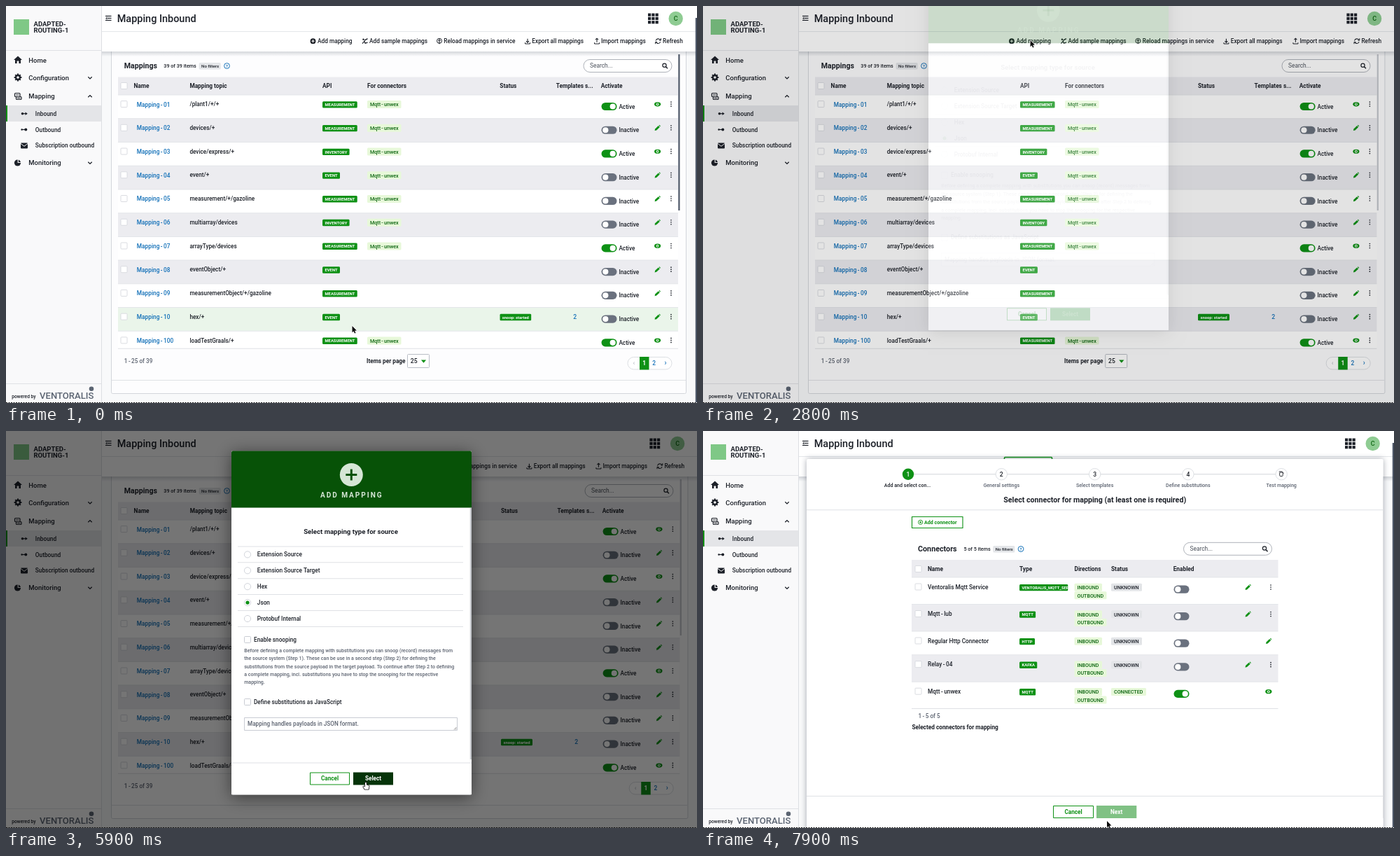
An HTML page with a canvas that plays this animation: 987x567 px, repeating every 8000 ms.

```html
<!DOCTYPE html>
<html lang="en">
<head>
<meta charset="utf-8">
<title>Mapping Inbound</title>
<style>
html, body { margin: 0; width: 100%; height: 100%; overflow: hidden; background: #fff; }
canvas { display: block; width: 987px; height: 567px; }
</style>
</head>
<body>
<canvas id="stage"></canvas>
<script>
const W = 987, H = 567, LOOP = 8000;
const cv = document.getElementById('stage'), c = cv.getContext('2d');
const dpr = window.devicePixelRatio || 1;
cv.width = W * dpr;
cv.height = H * dpr;

const GREEN = '#0e9115', DEEP = '#075207', INK = '#1d2129', MUTE = '#5c6370', BLUE = '#1270b8',
  GREY = '#ececf0', LINE = '#dfe1e5', LIME = '#e7f8d9', FOREST = '#0b640f';

const clamp = v => Math.max(0, Math.min(1, v));
const ramp = (t, a, b) => clamp((t - a) / (b - a));
const smooth = p => p * p * (3 - 2 * p);

// ---- primitives ----
function rect(x, y, w, h, fill, r = 0, stroke, lw = 1) {
  c.beginPath();
  c.roundRect(x, y, w, h, r);
  if (fill) { c.fillStyle = fill; c.fill(); }
  if (stroke) { c.strokeStyle = stroke; c.lineWidth = lw; c.stroke(); }
}
function disc(x, y, r, fill, stroke, lw = 1) {
  c.beginPath();
  c.arc(x, y, r, 0, Math.PI * 2);
  if (fill) { c.fillStyle = fill; c.fill(); }
  if (stroke) { c.strokeStyle = stroke; c.lineWidth = lw; c.stroke(); }
}
function path(pts, stroke, lw = 1, fill) {
  c.beginPath();
  pts.forEach(([x, y], i) => i ? c.lineTo(x, y) : c.moveTo(x, y));
  if (fill) { c.closePath(); c.fillStyle = fill; c.fill(); }
  if (stroke) { c.strokeStyle = stroke; c.lineWidth = lw; c.stroke(); }
}
const at = (x, y, pts) => pts.map(p => [x + p[0], y + p[1]]);
const hline = (x1, x2, y, col = LINE) => rect(x1, y - .5, x2 - x1, 1, col);

function text(s, x, y, size = 8.25, weight = 500, col = INK, align = 'left') {
  c.font = `${weight} ${size}px Roboto, Inter, sans-serif`;
  c.fillStyle = col;
  c.textAlign = align;
  c.fillText(s, x, y + size * .355);
  return c.measureText(s).width;
}
// hyphenated name with a little air around the hyphen
function dashed(s, x, y, size = 8.25, weight = 500, col = INK) {
  s.split(/(-)/).forEach(part => {
    x += text(part, x, y, size, weight, col) + size * .18;
  });
}
const bold = (s, x, y, size = 8.3, col = INK, align) => text(s, x, y, size, 700, col, align);

// ---- widgets ----
const box = (x, y) => rect(x - 4.5, y - 4.5, 9, 9, '#fff', 1, '#d6d9de', .9);
const dots = (x, y) => [-3, 0, 3].forEach(d => disc(x, y + d, .85, INK));

function badge(s, x, y, max = 99) {
  c.font = '700 5.85px Roboto, Inter, sans-serif';
  const w = Math.min(max, c.measureText(s).width + 7);
  c.save();
  c.beginPath();
  c.rect(x, y - 6, w, 12);
  c.clip();
  rect(x, y - 4.6, w, 9.4, GREEN, 1.5);
  text(s, x + 3.5, y + .2, 5.85, 700, '#fff');
  c.restore();
}
function chip(s, x, y, w, fill = LIME, col = FOREST) {
  rect(x, y - 5.5, w, 11, fill, 1.5);
  dashed(s, x + 4, y + .2, 7.15, 500, col);
}
function toggle(x, y, on) {
  rect(x, y - 5.6, 22, 11.2, on ? GREEN : '#6a717e', 5.6);
  disc(x + (on ? 16.2 : 5.8), y, 4.1, '#fff');
}
function eye(x, y) {
  c.beginPath();
  c.ellipse(x, y, 4.6, 3.1, 0, 0, 7);
  c.fillStyle = GREEN;
  c.fill();
  disc(x, y, 1.9, '#fff');
  disc(x, y, 1, GREEN);
}
function pencil(x, y) {
  path(at(x, y, [[-4, 4], [-3.4, 1.4], [1.2, -3], [3.2, -1], [-1.4, 3.4]]), null, 1, GREEN);
  path(at(x, y, [[1.9, -3.5], [2.8, -4.2], [4.3, -2.6], [3.7, -1.7]]), null, 1, GREEN);
}
function chevron(x, y, up) {
  const d = up ? -1 : 1;
  path(at(x, y, [[-2.7, -1.3 * d], [0, 1.4 * d], [2.7, -1.3 * d]]), INK, 1.3);
}
function search(x, y) {
  rect(x, y - 9, 126, 18, '#fff', 9, '#a5aab2', .9);
  text('Search...', x + 9, y, 8.4, 400, '#4c525c');
  disc(x + 115.5, y - .8, 2.6, null, INK, 1.2);
  path([[x + 117.4, y + 1.2], [x + 120, y + 3.8]], INK, 1.5);
}
function tools(x, y, count, badgeX, helpX) {
  text(count, x, y + .2, 7.2);
  rect(badgeX, y - 4.6, 31, 9.6, '#e4e6e9', 1.5);
  text('No filters', badgeX + 3.4, y + .3, 6.1);
  disc(helpX, y, 3.9, null, BLUE, 1);
  bold('?', helpX, y, 6, BLUE, 'center');
}
function button(s, x, y, w, fill) {
  if (fill) rect(x, y - 9, w, 18, fill);
  else rect(x + .5, y - 8.5, w - 1, 17, '#fff', 0, GREEN, 1);
  bold(s, x + w / 2, y, 8.2, fill ? '#fff' : GREEN, 'center');
}
function arrowDown(x, y, up) {
  const d = up ? -1 : 1;
  path([[x, y - 3.5], [x, y + 1.5]], INK, 1.1);
  path(at(x, y, up ? [[-2, -2], [0, -4], [2, -2]] : [[-2, 0], [0, 2], [2, 0]]), INK, 1.1);
  path(at(x, y, [[-3.5, 2], [-3.5, 3.8], [3.5, 3.8], [3.5, 2]]), INK, 1);
}

// ---- page ----
function sidebar() {
  rect(0, 0, 136, H, '#f9f9fa');
  rect(136, 0, 1, H, '#dddfe3');
  rect(11, 19, 22, 22, '#7fc886');
  bold('ADAPTED-', 39.5, 26, 9.5);
  bold('ROUTING-1', 39.5, 34.7, 9.5);
  hline(0, 136, 63.5);
  rect(0, 142, 136, 23, '#e4e5e8');
  rect(0, 142, 2, 23, GREEN);
  [['Home', 77.5], ['Configuration', 102.5], ['Mapping', 129], ['Monitoring', 224]]
    .forEach(([s, y]) => text(s, 32.3, y, 9.5));
  [['Inbound', 154], ['Outbound', 176.7], ['Subscription outbound', 199.5]]
    .forEach(([s, y]) => text(s, 41.8, y, 8.3));
  chevron(120, 102.5);
  chevron(120, 129, true);
  chevron(120, 224);

  path(at(17, 77, [[-6, 0], [0, -5.5], [6, 0], [4, 0], [4, 5], [1.4, 5], [1.4, 1.5], [-1.4, 1.5], [-1.4, 5], [-4, 5], [-4, 0]]), null, 1, INK);
  disc(17, 102, 3, null, INK, 2.4);
  for (let i = 0; i < 8; i++) {
    const a = i * Math.PI / 4, x = Math.cos(a), y = Math.sin(a);
    path([[17 + x * 3.8, 102 + y * 3.8], [17 + x * 5.4, 102 + y * 5.4]], INK, 2);
  }
  rect(12.5, 124.5, 7.5, 5, null, 1, INK, 1.2);
  rect(14.5, 129.5, 7.5, 4, null, 1, INK, 1.2);
  hline(14, 18.5, 127, INK);
  hline(16, 20.5, 131.5, INK);
  disc(16.5, 224, 4.6, INK);
  path([[17.2, 218], [17.2, 223.5], [22.5, 223.5]], '#f9f9fa', 1.2);
  disc(23.5, 153.7, 1.8, INK);
  path([[23, 153.7], [30, 153.7]], INK, 1.2);
  path(at(29, 153.7, [[-1.5, -2.2], [1.8, 0], [-1.5, 2.2]]), null, 1, INK);
  path([[22, 176.5], [28, 176.5]], INK, 1.2);
  disc(28.3, 176.5, 2, INK);
  disc(22.6, 176.5, 1.2, INK);
  rect(21, 195.5, 10, 8, INK, 1);
  path([[21, 196.5], [26, 200.3], [31, 196.5]], '#f9f9fa', 1);

  hline(0, 136, 539.5);
  text('powered by', 8.3, 558, 6.65);
  text('VENTORALIS', 48, 556.3, 13.1, 500, '#5b6472');
  disc(122, 546.8, 3.3, '#5b6472');
}

function header(s, ring) {
  rect(137, 0, W - 137, 65, '#fff');
  hline(137, W, 36.5, '#e4e6ea');
  [-3.2, -.2, 2.8].forEach((d, i) => rect(i === 1 ? 145 : 142, 17 + d, i === 1 ? 5.5 : 8.5, 1.2, INK));
  path(at(143.4, 17.4, [[1, -1.8], [-1.2, 0], [1, 1.8]]), null, 1, INK);
  text('Mapping Inbound', 158.7, 17.8, 14.45);

  c.save();
  c.translate(s, 0);
  for (let i = 0; i < 9; i++) rect(917 + i % 3 * 5.3, 10.5 + Math.floor(i / 3) * 5.3, 4.2, 4.2, INK);
  disc(956.7, 18, 10.2, '#8fcc93');
  text('C', 956.7, 18.2, 9, 500, FOREST, 'center');
  if (ring) rect(430.5, 37.5, 68, 26, '#fff', 1, GREEN, 1.6);

  const y = 50.2;
  disc(438.5, y, 3.9, INK);
  path([[436.3, y], [440.7, y]], '#fff', 1);
  path([[438.5, y - 2.2], [438.5, y + 2.2]], '#fff', 1);
  path(at(513, y, [[-4, 3.5], [-1, 0], [0, 3], [3.5, 2]]), INK, 1.2);
  path(at(513, y, [[-1, -1], [3.5, -3.5]]), INK, 1.4);
  disc(510.5, y - 2.5, 1.2, INK);
  disc(619, y - .4, 3.5, null, INK, 1);
  path([[619, y + 4], [619, y - 2]], INK, 1.1);
  path(at(619, y - 1.6, [[-1.6, 1.2], [0, -1], [1.6, 1.2]]), INK, 1);
  arrowDown(745, y);
  arrowDown(844, y, true);
  c.beginPath();
  c.arc(931.5, y, 3.3, .3, 2.8);
  c.moveTo(928.4, y - 1);
  c.arc(931.5, y, 3.3, 3.45, 5.9);
  c.strokeStyle = INK;
  c.lineWidth = 1.1;
  c.stroke();
  path(at(935, y - 2, [[-2, .8], [.4, .8], [.4, -2]]), INK, 1);
  path(at(928, y + 2, [[2, -.8], [-.4, -.8], [-.4, 2]]), INK, 1);
  [['Add mapping', 445], ['Add sample mappings', 519], ['Reload mappings in service', 625.3],
   ['Export all mappings', 751.3], ['Import mappings', 850], ['Refresh', 938]]
    .forEach(([t, x]) => text(t, x, y, 8.3));
  c.restore();
}

const ROWS = `01 /plant1/+/+ M 1 1
02 devices/+ M 1 0
03 device/express/+ I 1 1
04 event/+ E 1 0
05 measurement/+/gazoline M 1 0
06 multiarray/devices I 1 0
07 arrayType/devices M 1 1
08 eventObject/+ E 0 0
09 measurementObject/+/gazoline M 0 0
10 hex/+ E 0 0
100 loadTestGraals/+ M 1 1`.split('\n').map(l => l.split(' '));
const API = { M: 'MEASUREMENT', I: 'INVENTORY', E: 'EVENT' };
const STEP = 33.73;

function table(s, hover, bar) {
  const X = x => x + s * (x - 160) / 800;
  rect(137, 65, W - 137, H - 65, '#f8f9fa');
  rect(150.5, 60, X(971.5) - 150.5, 493.5, '#fdfdfe', 2, '#d3d6db');
  const g = c.createLinearGradient(0, 64, 0, 72);
  g.addColorStop(0, 'rgba(70,80,95,.25)');
  g.addColorStop(1, 'rgba(70,80,95,0)');
  rect(137, 64.5, W - 137, 8, g);

  bold('Mappings', 168.8, 85.3, 10.6);
  tools(225.3, 85.5, '39 of 39 items', 275.7, 315.5);
  search(X(825), 85.5);
  rect(160, 101.5, X(960) - 160, 25.5, GREY);
  box(168.5, 114);
  [['Name', 182.5], ['Mapping topic', 262.4], ['API', 452], ['For connectors', 516], ['Status', 705.3],
   ['Templates s...', 785.7], ['Activate', 849.7]].forEach(([t, x]) => bold(t, X(x), 114.3));

  c.save();
  c.beginPath();
  c.rect(150, 100, 840, 389);
  c.clip();
  ROWS.forEach(([id, topic, api, conn, on], i) => {
    const top = 127 + i * STEP, y = top + 13.6;
    rect(160, top, X(960) - 160, STEP, i === hover ? '#eaf5ea' : i % 2 ? GREY : '#fff');
    hline(160, X(960), top, '#e3e5e9');
    box(168.5, y - .5);
    dashed('Mapping-' + id, 186.8, y, 8.3, 500, BLUE);
    text(topic, X(262.4), y - .3, 8.2);
    badge(API[api], X(452), y + .2);
    if (+conn) chip('Mqtt-unwex', X(516), y, 48.5);
    if (id === '10') {
      badge('snoop: started', X(705.3), y + .2);
      text('2', X(812.8), y, 8.6, 500, BLUE, 'center');
    }
    toggle(X(850.5), y + 2.9, +on);
    text(+on ? 'Active' : 'Inactive', X(875.4), y + 3.1, 8.2);
    (+on ? eye : pencil)(X(930.6), y - .3);
    dots(X(950), y - .5);
  });
  c.restore();
  hline(160, X(960), 489.2, LINE);
  rect(X(960.3), 69, 2.2, 223, bar);

  dashed('1-25 of 39', 168.8, 507.2, 8.2, 500, MUTE);
  bold('Items per page', X(515), 507.2, 8.25);
  rect(X(573.5), 497.5, 31, 19, '#fff', 1, '#b9bdc5');
  text('25', X(577.8), 507.2, 8.6);
  path(at(X(596.5), 507.5, [[-3.6, -2], [3.6, -2], [0, 2.2]]), null, 1, GREEN);
  rect(X(888), 501.5, 63, 17.5, '#fff', 8.7, '#dcdfe3');
  rect(X(905), 501, 13.5, 18.5, GREEN);
  bold('1', X(911.7), 510.3, 8.4, '#fff', 'center');
  text('2', X(925.6), 510.3, 8.4, 500, BLUE, 'center');
  text('‹', X(897), 509.6, 9, 500, '#b8bcc4', 'center');
  text('›', X(942), 509.6, 10, 500, BLUE, 'center');
  hline(151, X(971), 534.5);
}

// ---- dialog ----
const BOX = { x: 322, y: 28.5, w: 343, h: 491 };
const TYPES = ['Extension Source', 'Extension Source Target', 'Hex', 'Json', 'Protobuf Internal'];
const NOTE = ['Before defining a complete mapping with substitutions you can snoop (record) messages from',
  'the source system (Step 1). These can be use in a second step (Step 2) for defining the',
  'substitutions from the source payload in the target payload. To continue after Step 2 to defining',
  'a complete mapping, incl. substitutions you have to stop the snooping for the respective', 'mapping.'];

// dims and shades the page around the dialog, leaving the dialog's own area lit
function backdrop(alpha, dy) {
  c.save();
  c.beginPath();
  c.rect(0, 0, W, H);
  c.rect(BOX.x, BOX.y + dy, BOX.w, BOX.h);
  c.clip('evenodd');
  rect(0, 0, W, H, `rgba(0,0,0,${.54 * alpha})`);
  c.globalAlpha = alpha;
  c.shadowColor = 'rgba(0,0,0,.5)';
  c.shadowBlur = 22 * dpr;
  c.shadowOffsetY = 3 * dpr;
  rect(BOX.x, BOX.y + dy, BOX.w, BOX.h, '#000');
  c.restore();
}

function dialog(alpha, dy, hot, bar) {
  c.save();
  c.translate(0, dy);
  c.globalAlpha = alpha;
  rect(BOX.x, 109.5, BOX.w, 410, '#fff', [0, 0, 2, 2]);
  rect(BOX.x, BOX.y, BOX.w, 81, DEEP, [2, 2, 0, 0]);
  button('Cancel', 434, 496.5, 57);
  button('Select', 496, 496.5, 57, hot ? '#06340a' : GREEN);

  c.globalAlpha = Math.sqrt(alpha);
  disc(493.3, 62.5, 16.5, '#d6e6d6');
  c.letterSpacing = '1.95px';
  bold('ADD MAPPING', 449, 91, 10.1, '#d6e6d6');
  c.letterSpacing = '0px';

  // fine print comes in behind the panel
  c.globalAlpha = alpha ** 2;
  rect(485.3, 61, 16, 3, DEEP);
  rect(491.8, 54.5, 3, 16, DEEP);
  bold('Select mapping type for source', 492.5, 144, 9.6, INK, 'center');
  hline(331, 653, 165);
  TYPES.forEach((s, i) => {
    const y = 176.4 + i * 22.9;
    disc(345, y, 4.6, '#fff', '#ccd0d6', .9);
    if (s === 'Json') disc(345, y, 2.6, GREEN);
    text(s, 358.8, y, 8.25);
    hline(331, 653, y + 11.4);
  });
  [['Enable snooping', 297.6], ['Define substitutions as JavaScript', 386.8]].forEach(([s, y]) => {
    rect(340.5, Math.floor(y) - 3.5, 9, 9, '#fff', 1, '#c3c7ce', .9);
    text(s, 354, y, 8.22);
  });
  NOTE.forEach((s, i) => text(s, 340.2, 313.2 + i * 11.4, 7.05, 500, MUTE));
  rect(340.5, 409.5, 304, 18, '#fff', 0, '#c3c7ce', .9);
  text('Mapping handles payloads in JSON format.', 345, 418.3, 8.2, 500, MUTE);
  path([[640, 426.5], [643.5, 423]], '#777', .8);
  path([[642, 426.5], [643.5, 425]], '#777', .8);
  hline(322, 665, 474);
  rect(662.8, 110, 2.2, 359, bar);
  c.restore();
}

// ---- drawer ----
const STEPS = ['Add and select con...', 'General settings', 'Select templates', 'Define substitutions', 'Test mapping'];
const CONNS = [
  ['Ventoralis Mqtt Service', 'VENTORALIS_MQTT_SERVICE', 209, 38.5],
  ['Mqtt-lub', 'MQTT', 247.5, 38.5],
  ['Regular Http Connector', 'HTTP', 286, 33.7],
  ['Relay-04', 'KAFKA', 319.7, 38.5],
  ['Mqtt-unwex', 'MQTT', 358.2, 38.3]];

function drawer(dy) {
  c.save();
  c.translate(0, dy);
  c.shadowColor = 'rgba(30,40,60,.4)';
  c.shadowBlur = 9 * dpr;
  rect(148, 40, 823.7, 560, '#fff', 2);
  c.shadowColor = 'transparent';
  hline(293, 826, 61.7, '#d3d6da');
  STEPS.forEach((s, i) => {
    const x = 293 + i * 133.3;
    disc(x, 61.7, 8.2, i ? '#fff' : GREEN, i ? '#d9dce0' : null, .9);
    if (i < 4) text(i + 1, x, 61.8, 8.6, 500, i ? INK : '#fff', 'center');
    else {
      rect(x - 2.5, 59, 4.5, 5.5, null, 1, INK, .9);
      path(at(x, 61.5, [[-3.5, -3.5], [1, -3.5], [3.3, -1]]), INK, .9);
    }
    text(s, x - (i ? 0 : 1), 77.2, 7.1, 500, i ? MUTE : INK, 'center');
  });
  bold('Select connector for mapping (at least one is required)', 559.7, 98.5, 10.65, INK, 'center');
  hline(148, 971.5, 112.7);
  rect(298.5, 122.5, 72.5, 16, '#fff', 0, GREEN, 1.1);
  disc(310.6, 130.3, 3.1, null, GREEN, .9);
  path([[309, 130.3], [312.2, 130.3]], GREEN, .9);
  path([[310.6, 128.7], [310.6, 131.9]], GREEN, .9);
  bold('Add connector', 316, 130.4, 7.1, GREEN);
  bold('Connectors', 307, 168.2, 10.75);
  tools(372.4, 168.5, '5 of 5 items', 414.3, 454);
  search(686.5, 168.3);

  rect(298, 184, 523.5, 25, GREY);
  box(307.5, 197);
  [['Name', 321], ['Type', 452], ['Directions', 530.5], ['Status', 583], ['Enabled', 671.7]]
    .forEach(([s, x]) => bold(s, x, 197.2));
  CONNS.forEach(([name, type, top, h], i) => {
    const y = top + 14, last = i === 4, http = i === 2;
    rect(298, top, 523.5, h, i % 2 ? GREY : '#fff');
    hline(298, 821.5, top, '#e3e5e9');
    box(307.5, y - .5);
    dashed(name, 321, y - .2, 8.3);
    badge(type, 452, y + .5, 69.5);
    chip('INBOUND', 530.5, y + .3, 39.5);
    if (!http) chip('OUTBOUND', 530.5, y + 11.8, 46);
    if (last) chip('CONNECTED', 583, y + .3, 50);
    else chip('UNKNOWN', 583, y + .3, 44, '#e3e5e8', INK);
    toggle(672.5, y + 3.2, last);
    if (last) eye(807.8, y);
    else pencil(http ? 808 : 778.5, y);
    if (!last && !http) dots(811, y);
  });
  hline(298, 821.5, 396.5);
  dashed('1-5 of 5', 307.4, 406.6, 8.2, 500, MUTE);
  bold('Selected connectors for mapping', 298.4, 422.7, 8.28);
  hline(148, 971.5, 521.5);
  button('Cancel', 500, 544, 58);
  button('Next', 562, 544, 57.3, '#80c184');
  c.restore();
}

// ---- pointer ----
const MOVES = [[200, 494.5, 457], [1300, 467, 48], [3100, 467.6, 49], [4050, 372, 254],
  [4400, 372, 254], [5500, 514, 502], [6900, 514, 502], [7700, 577, 557]];

function pointer(t) {
  let i = 0;
  while (i < MOVES.length - 2 && t >= MOVES[i + 1][0]) i++;
  const a = MOVES[i], b = MOVES[i + 1], p = smooth(ramp(t, a[0], b[0]));
  return [a[1] + (b[1] - a[1]) * p, a[2] + (b[2] - a[2]) * p];
}
function drawPointer(x, y, hand) {
  c.lineJoin = 'round';
  const shape = hand
    ? [[-1, 0], [.6, 0], [1, 3.6], [4, 4.3], [4.6, 5.4], [3.8, 9.8], [-1.6, 9.8], [-3.8, 6.2], [-3, 5.3], [-1.2, 6.6]]
    : [[0, 0], [0, 9.2], [2.1, 7.4], [3.5, 10.6], [5, 9.9], [3.6, 6.8], [6.4, 6.6]];
  path(at(x, y, [...shape, shape[0]]), hand ? '#111' : '#fff', hand ? 1.6 : 1.4);
  path(at(x, y, shape), null, 1, hand ? '#fff' : '#0a0a0a');
  c.lineJoin = 'miter';
}

function draw(t) {
  c.setTransform(dpr, 0, 0, dpr, 0, 0);
  c.clearRect(0, 0, W, H);
  const [mx, my] = pointer(t);
  const open = t >= 2770 && t < 6080;
  const fade = t < 5930 ? ramp(t, 2770, 2920) : 1 - ramp(t, 5930, 6080);
  const drop = t < 5930 ? 70 * (1 - ramp(t, 2770, 3070)) ** 2 : 70 * ramp(t, 5930, 6230);
  const late = t >= 6080;
  const shift = open ? 2.4 : 0;
  const fresh = late ? 1 : 1 - ramp(t, 300, 600);
  const barTint = k => `rgba(68,78,95,${.3 + .65 * k})`;
  const hover = t < 2770 && my > 127 && my < 489 ? Math.floor((my - 127) / STEP) : -1;

  rect(0, 0, W, H, '#fff');
  table(shift, hover, barTint(fresh));
  if (late) rect(148, 65, 824, 488, 'rgba(60,68,80,.24)');
  header(shift, t >= 6000);
  sidebar();
  if (!open) rect(984.8, 17, 2.2, 549, barTint(fresh * 1.05 - .05));

  if (fade > 0) {
    const hot = open && mx > 496 && mx < 553 && my > 486 && my < 506;
    backdrop(fade, -drop);
    dialog(fade, -drop, hot, barTint(1 - ramp(t, 4300, 4700)));
  }
  if (t >= 6040) drawer(527 * (1 - ramp(t, 6040, 6440)) ** 5.5);

  c.setLineDash([2, 1.5]);
  path([[0, 566.5], [W, 566.5]], '#111', 1);
  c.setLineDash([]);
  const hand = t < 6080 && t > 4400 && mx > 496 && my > 487;
  drawPointer(mx, my, hand);
}

const start = performance.now();
function tick() {
  draw((performance.now() - start) % LOOP);
  requestAnimationFrame(tick);
}
tick();
</script>
</body>
</html>
```
